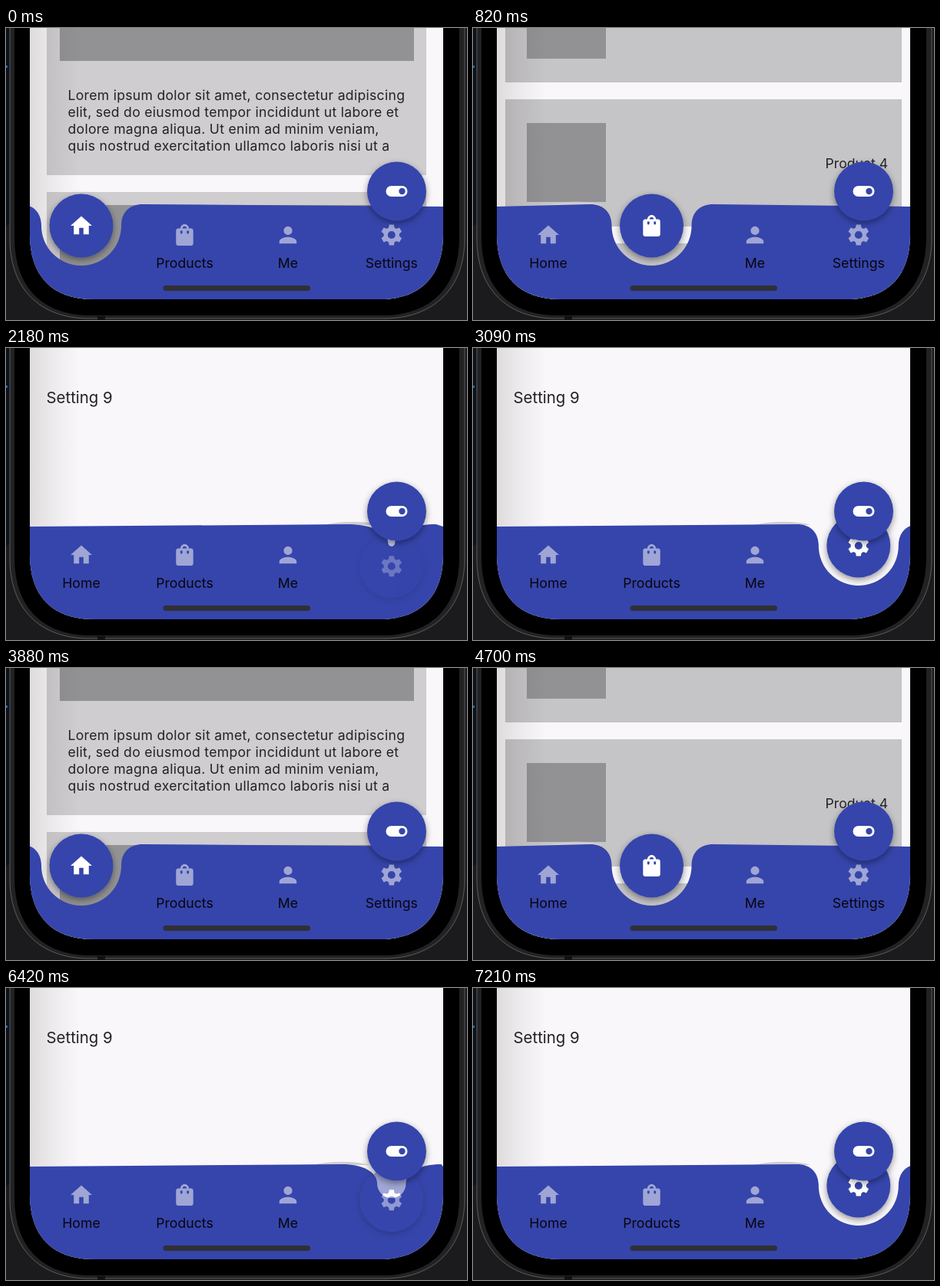
Animation of 600 by 381 pixels, one loop 7270 ms. Source, as an HTML page:

```html
<!DOCTYPE html>
<html lang="en">
<head>
<meta charset="utf-8">
<title>Notched tab bar</title>
<style>
  html, body { margin: 0; width: 100%; height: 100%; overflow: hidden; background: #1b1b1e; }
  svg { display: block; width: 600px; height: 381px; }
  text { font: 17.6px Inter, sans-serif; fill: #222124; }
  .label { font-size: 17.7px; fill: #06060e; text-anchor: middle; }
  .body { letter-spacing: .28px; }
  .bar { fill: #3645ab; }
  .card { fill: #cfcdd0; }
  .tile { fill: #c5c4c6; }
  .pic { fill: #929193; }
</style>
</head>
<body>
<svg viewBox="0 0 600 381" xmlns="http://www.w3.org/2000/svg">
  <defs>
    <clipPath id="screen"><path d="M31 0H569V270C569 322 541 354 486 354H114C59 354 31 322 31 270Z"/></clipPath>
    <linearGradient id="edge">
      <stop offset="0" stop-color="#30201c" stop-opacity=".13"/>
      <stop offset=".45" stop-color="#30201c" stop-opacity=".06"/>
      <stop offset="1" stop-color="#30201c" stop-opacity="0"/>
    </linearGradient>
    <filter id="lift" x="-30%" y="-30%" width="160%" height="170%">
      <feDropShadow dx="0" dy="3" stdDeviation="4" flood-color="#000" flood-opacity=".42"/>
    </filter>
  </defs>

  <rect width="600" height="381" fill="#1b1b1e"/>
  <rect width="5" height="257" fill="#0d131b"/>
  <rect y="49" width="2" height="3" fill="#1c6d9f"/>
  <path d="M5-5V275C5 339 43 379 108 379H492C557 379 597 339 597 275V-5Z" fill="#222224" stroke="#5d5d5f"/>
  <path d="M11-5V273C11 337 46 375 110 375H490C554 375 590 337 590 273V-5Z" fill="#000"/>
  <rect x="119" y="376" width="10" height="5" fill="#111113"/>

  <g clip-path="url(#screen)">
    <rect x="31" width="538" height="354" fill="#f9f7fa"/>
    <g class="page">
      <path class="card" d="M53 0H547V192H53ZM53 214H547V354H53Z"/>
      <path class="pic" d="M70 0H531V43H70ZM70 231H531V354H70Z"/>
      <g class="body">
        <text x="80.5" y="94">Lorem ipsum dolor sit amet, consectetur adipiscing</text>
        <text x="80.5" y="116">elit, sed do eiusmod tempor incididunt ut labore et</text>
        <text x="80.5" y="138">dolore magna aliqua. Ut enim ad minim veniam,</text>
        <text x="80.5" y="160">quis nostrud exercitation ullamco laboris nisi ut a</text>
      </g>
    </g>
    <g class="page">
      <path class="tile" d="M42 0H558V71H42ZM42 93H558V259H42ZM42 281H558V354H42Z"/>
      <path class="pic" d="M70 0H173V40H70ZM70 124H173V227H70Z"/>
      <text x="540" y="183" text-anchor="end">Product 4</text>
    </g>
    <g class="page"></g>
    <g class="page"><text x="52.5" y="72" style="font-size:20.4px">Setting 9</text></g>
    <rect x="31" width="65" height="354" fill="url(#edge)"/>

    <path id="ridge" fill="#cfcdcf"/>
    <path id="bar" class="bar"/>
    <g id="tabs"></g>
    <rect x="204.500" y="336" width="191.500" height="7" rx="3.500" fill="#303036"/>
    <g id="button">
      <circle class="bar" r="41.500" filter="url(#lift)"/>
      <path id="glyph" fill="#fff" fill-rule="evenodd" transform="scale(1.4) translate(-12 -12)"/>
    </g>
    <g transform="translate(508.5 213)">
      <circle class="bar" r="38.500" filter="url(#lift)"/>
      <rect x="-14" y="-7" width="28" height="14" rx="7" fill="#fff"/>
      <circle class="bar" cx="7" r="4.200"/>
    </g>
  </g>
</svg>
<script>
const $ = id => document.getElementById(id);
const clamp = v => Math.max(0, Math.min(1, v));
const ease = v => (1 - Math.cos(Math.PI * clamp(v))) / 2;

function gearPath() {
  const pts = [];
  for (let i = 0; i < 6; i++) {
    for (const [turn, r] of [[-.38, 7.3], [-.22, 9.9], [.22, 9.9], [.38, 7.3]]) {
      const a = i * Math.PI / 3 - Math.PI / 2 + turn;
      pts.push((12 + r * Math.cos(a)).toFixed(2) + ' ' + (12 + r * Math.sin(a)).toFixed(2));
    }
  }
  return `M${pts.join('L')}ZM8.4 12a3.6 3.6 0 1 0 7.2 0a3.6 3.6 0 1 0-7.2 0Z`;
}

const TABS = [
  { x: 98, name: 'Home', icon: 'M10 20v-6h4v6h5v-8h3L12 3 2 12h3v8z' },
  { x: 232.5, name: 'Products', icon: 'M18 6h-2c0-2.2-1.8-4-4-4S8 3.8 8 6H6c-1.1 0-2 .9-2 2v12c0 1.1.9 2 2 2h12c1.1 0 2-.9 2-2V8c0-1.1-.9-2-2-2zM10 10a1 1 0 0 1-2 0V8h2zM12 4c1.1 0 2 .9 2 2h-4c0-1.1.9-2 2-2zM16 10a1 1 0 0 1-2 0V8h2z' },
  { x: 367, name: 'Me', icon: 'M12 12a4 4 0 1 0 0-8a4 4 0 0 0 0 8zM12 14c-2.7 0-8 1.3-8 4v2h16v-2c0-2.700-5.300-4-8-4z' },
  { x: 501.8, name: 'Settings', icon: gearPath() }
];

// [time of tap in ms, tab]
const TAPS = [[-900, 0], [50, 1], [860, 2], [1742, 3], [3130, 0], [3990, 1], [5000, 2], [5950, 3]];
const LOOP = 7270, HALF = 300, TOP = 230, UP = 258, DOWN = 306;

$('tabs').innerHTML = TABS.map(t => `<g>
  <path d="${t.icon}" fill="#fff" fill-opacity=".52" fill-rule="evenodd"
    transform="translate(${t.x} 270) scale(1.4) translate(-12 -12)"/>
  <text class="label" x="${t.x}" y="313">${t.name}</text></g>`).join('');
const tabs = [...$('tabs').children];
const pages = [...document.querySelectorAll('.page')];

function barPath(x, p) {
  const r = 52 * p, e = 56 + 24 * p, cy = 254 + 4 * p, c = r + (e - r) * .4;
  return `M31 233L${x - e} ${TOP}C${x - c} ${TOP} ${x - r} 240 ${x - r} ${cy}` +
    `A${r} ${r} 0 0 0 ${x + r} ${cy}C${x + r} 240 ${x + c} ${TOP} ${x + e} ${TOP}` +
    'L569 233V354H31Z';
}

function draw(t) {
  let n = TAPS.length - 1;
  while (TAPS[n][0] > t) n--;
  const [start, cur] = TAPS[n];
  const prev = n ? TAPS[n - 1][1] : cur;
  const age = t - start;
  const sinking = age < HALF;
  const shown = TABS[sinking ? prev : cur];
  const rise = sinking ? 1 - ease(age / HALF) : ease(age / HALF - 1);
  const open = clamp((rise - .39) / .61);

  pages.forEach((g, i) => g.style.display = i === cur ? '' : 'none');
  tabs.forEach((g, i) => {
    g.style.opacity = i === cur ? clamp(1 - age / 150) : i === prev ? clamp(age / 150 - 1) : 1;
  });

  $('bar').setAttribute('d', barPath(shown.x, open));
  const wall = shown.x - 52 * open;
  $('ridge').setAttribute('d', `M${wall - 85} 231C${wall - 62} 226 ${wall - 32} 225 ${wall - 10} 231Z`);
  $('ridge').style.opacity = clamp(open * 15);

  $('button').setAttribute('transform', `translate(${shown.x} ${DOWN + (UP - DOWN) * rise})`);
  $('button').style.opacity = rise ** 1.6;
  $('glyph').setAttribute('d', shown.icon);
}

const began = performance.now();
function tick() {
  draw((performance.now() - began) % LOOP);
  requestAnimationFrame(tick);
}
tick();
</script>
</body>
</html>
```
